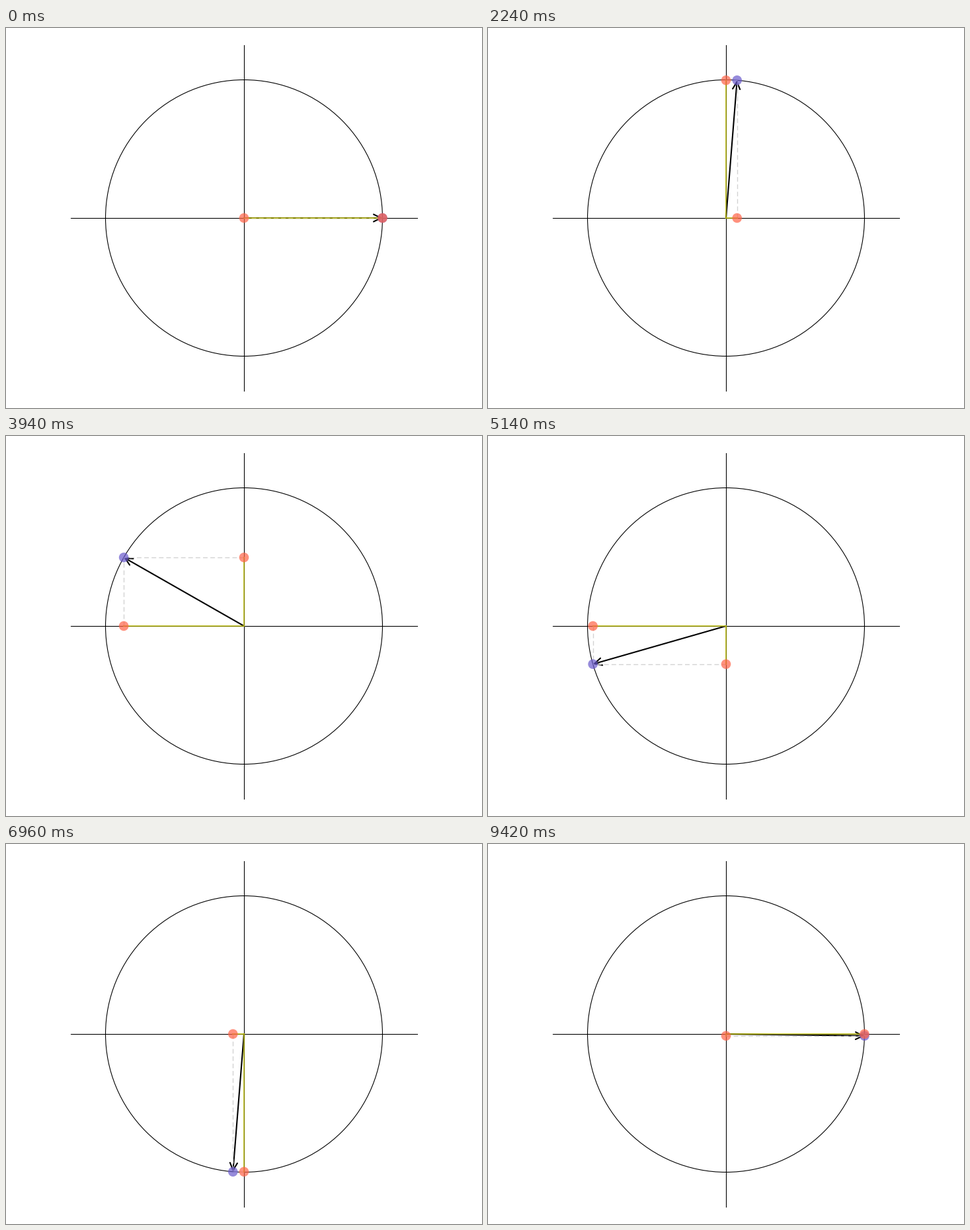
Animation of 720 by 576 pixels, one loop 9440 ms. Source, as a matplotlib script:

```python
import numpy as np
import matplotlib.pyplot as plt
from matplotlib.animation import FuncAnimation
from matplotlib.patches import Circle, FancyArrowPatch

FRAMES, INTERVAL = 472, 20
AXIS = 1.25            # half length of the axis lines
LIMIT = AXIS * 1.1     # half height of the view
DASH = (0, (5, 3))

fig = plt.figure(figsize=(7.2, 5.76), dpi=100, facecolor="white")
ax = fig.add_axes([0, 0, 1, 1])
ax.set_xlim(-LIMIT * 1.25, LIMIT * 1.25)
ax.set_ylim(-LIMIT, LIMIT)
ax.set_aspect("equal")
ax.axis("off")


def line(xs=(), ys=(), **style):
    return ax.plot(xs, ys, **style)[0]


def dot(color, z):
    return ax.add_patch(Circle((0, 0), 0.035, fc=color, ec="none",
                               alpha=0.7, zorder=z))


line([-AXIS, AXIS], [0, 0], color="black", lw=0.8, zorder=1)
line([0, 0], [-AXIS, AXIS], color="black", lw=0.8, zorder=1)
ax.add_patch(Circle((0, 0), 1, fill=False, ec="black", lw=0.8, zorder=1))

arrow = ax.add_patch(FancyArrowPatch((0, 0), (1, 0), arrowstyle="->",
                                     mutation_scale=20, lw=1.5, color="black",
                                     shrinkA=0, shrinkB=0, zorder=2))
drop_x, drop_y = (line(color="lightgray", lw=1, ls=DASH, zorder=3)
                  for _ in range(2))
part_x, part_y = (line(color="y", lw=1.5, alpha=0.7, zorder=4)
                  for _ in range(2))
tip = dot("slateblue", 5)
foot_x, foot_y = dot("tomato", 6), dot("tomato", 6)


def update(i):
    angle = 2 * np.pi * i / FRAMES
    x, y = np.cos(angle), np.sin(angle)
    arrow.set_positions((0, 0), (x, y))
    drop_x.set_data([x, x], [0, y])
    drop_y.set_data([0, x], [y, y])
    part_x.set_data([0, x], [0, 0])
    part_y.set_data([0, 0], [0, y])
    tip.center = x, y
    foot_x.center = x, 0
    foot_y.center = 0, y
    return arrow, drop_x, drop_y, part_x, part_y, tip, foot_x, foot_y


anim = FuncAnimation(fig, update, frames=FRAMES, interval=INTERVAL,
                     repeat=True, repeat_delay=0)
plt.show()
```
